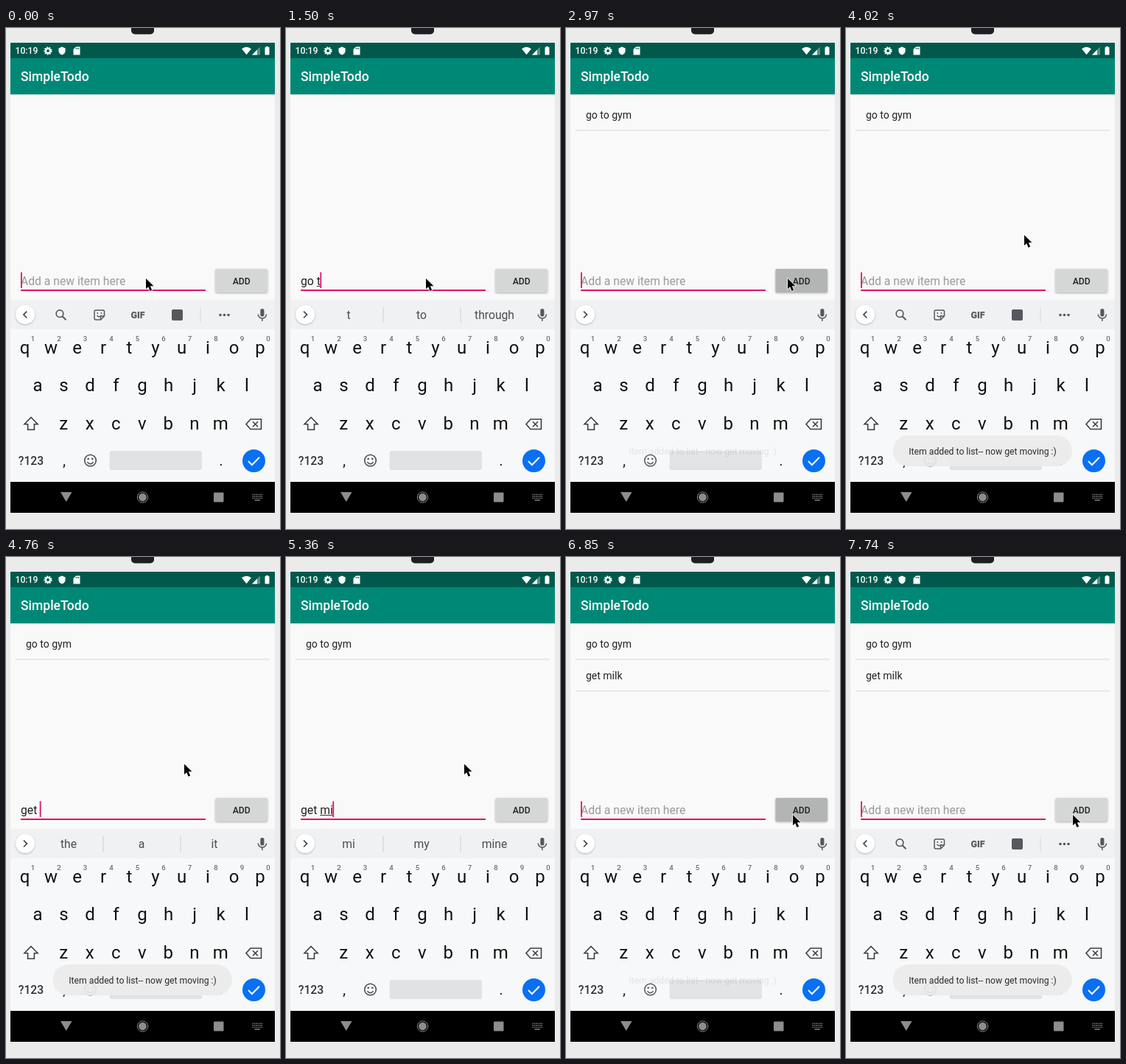
Recreate the animation shown at these times as an HTML page with a canvas. Size 372 px wide and 680 px high, loop 8 s.

```html
<!DOCTYPE html>
<html lang="en">
<head>
<meta charset="utf-8">
<title>Todo list</title>
<style>
html, body { margin: 0; width: 100%; height: 100%; overflow: hidden; background: #ebebec; }
canvas { display: block; width: 372px; height: 680px; }
</style>
</head>
<body>
<canvas id="stage"></canvas>
<script>
const W = 372, H = 680, LOOP = 8000;
const canvas = document.getElementById('stage');
const ratio = window.devicePixelRatio || 1;
canvas.width = W * ratio;
canvas.height = H * ratio;
const ctx = canvas.getContext('2d');

const ACCENT = '#e0106b', ICON = '#55595e';
const ADDED = { text: '', words: [], caret: true };

// Each step changes part of the state; words: null shows the tool icons.
const steps = [
  [0, { text: '', words: null, caret: true, mouse: [190, 340], items: [], button: '#d5d7d6', toast: 0 }],
  [300, { text: 'g', words: ['g', 'good', 'go'] }],
  [450, { text: 'go', words: ['go', 'going', 'good'] }],
  [1050, { caret: false }],
  [1200, { text: 'go ', words: ['to', 'back', 'ahead'], caret: true }],
  [1350, { text: 'go t' }],
  [1500, { words: ['t', 'to', 'through'] }],
  [1640, { text: 'go to', words: ['to', 'too', 'today'] }],
  [1790, { text: 'go to ', words: ['the', 'bed', 'sleep'] }],
  [1940, { text: 'go to gy', words: ['gy', 'gym', 'guy'] }],
  [2080, { text: 'go to gym', words: ['gym', 'gyms', 'gym and'] }],
  [2530, { caret: false, mouse: [218, 342] }],
  [2680, { mouse: [278, 341] }],
  [2830, { mouse: [301, 340], button: '#c3c5c4' }],
  [2970, { ...ADDED, items: ['go to gym'], button: '#b3b5b4', toast: 0.1 }],
  [3120, { words: null, toast: 0.85 }],
  [3270, { button: '#d5d7d6', toast: 1 }],
  [3420, { mouse: [296, 334] }],
  [3570, { mouse: [274, 309], caret: false }],
  [3720, { mouse: [259, 296] }],
  [3870, { mouse: [246, 285] }],
  [4020, { mouse: [242, 281], caret: true }],
  [4470, { text: 'g', words: ['g', 'go', 'good'] }],
  [4620, { text: 'get', words: ['get', 'gets', 'getting'] }],
  [4760, { text: 'get ', words: ['the', 'a', 'it'] }],
  [5060, { toast: 0.5 }],
  [5210, { text: 'get m', words: ['m', 'my', 'me'], toast: 0 }],
  [5360, { text: 'get mi', words: ['mi', 'my', 'mine'] }],
  [5510, { text: 'get mil', words: ['mil', 'milk', 'mild'] }],
  [5660, { text: 'get milk' }],
  [5810, { words: ['milk', 'cup', 'Jorv to'] }],
  [6250, { caret: false, mouse: [277, 306] }],
  [6400, { mouse: [298, 335] }],
  [6550, { mouse: [308, 350] }],
  [6700, { button: '#c3c5c4' }],
  [6850, { ...ADDED, items: ['go to gym', 'get milk'], button: '#b3b5b4', toast: 0.1 }],
  [7000, { words: null, button: '#c9cbca', toast: 0.85 }],
  [7150, { button: '#d5d7d6', toast: 0.97 }],
  [7300, { caret: false, toast: 1 }],
  [7740, { caret: true }]
];

function stateAt(time) {
  return Object.assign({}, ...steps.filter(s => s[0] <= time).map(s => s[1]));
}

function rect(x, y, w, h, color, radius = 0) {
  ctx.fillStyle = color;
  ctx.beginPath();
  ctx.roundRect(x, y, w, h, radius);
  ctx.fill();
}

function disc(x, y, r, color) {
  ctx.fillStyle = color;
  ctx.beginPath();
  ctx.arc(x, y, r, 0, 7);
  ctx.fill();
}

function ring(x, y, r, color, width) {
  ctx.strokeStyle = color;
  ctx.lineWidth = width;
  ctx.beginPath();
  ctx.arc(x, y, r, 0, 7);
  ctx.stroke();
}

function stroke(path, color, width = 1.6) {
  ctx.strokeStyle = color;
  ctx.lineWidth = width;
  ctx.stroke(new Path2D(path));
}

function fill(path, color) {
  ctx.fillStyle = color;
  ctx.fill(new Path2D(path));
}

function label(str, x, y, size, color, align = 'left', weight = 400) {
  ctx.font = `${weight} ${size}px Roboto, sans-serif`;
  ctx.textAlign = align;
  ctx.fillStyle = color;
  ctx.fillText(str, x, y);
}

function shadowed(blur, dy, alpha, draw) {
  ctx.save();
  ctx.shadowColor = `rgba(0,0,0,${alpha})`;
  ctx.shadowBlur = blur * ratio;
  ctx.shadowOffsetY = dy * ratio;
  draw();
  ctx.restore();
}

function drawStatusBar() {
  rect(6, 20, 359, 21, '#00594c');
  label('10:19', 12.5, 35, 12.2, '#fff', 'left', 500);
  ring(57, 31, 3.1, '#fff', 2.4);
  ctx.setLineDash([2, 1.35]);
  ring(57, 31, 4.8, '#fff', 1.6);
  ctx.setLineDash([]);
  fill('M76 25.5l4.6 2v3.2c0 2.8-2 5-4.6 5.8c-2.6-.8-4.6-3-4.6-5.8v-3.2z', '#fff');
  fill('M95 25.5h5.5v11h-9v-7.5z', '#fff');
  for (let i = 0; i < 3; i++) rect(94.6 + i * 1.8, 27, 0.9, 2, '#00594c');
  fill('M320 28.2q6.5-5 13 0l-6.5 8z', '#fff');
  fill('M345 25.5v11h-11z', 'rgba(255,255,255,.35)');
  fill('M341 29.5v7h-7z', '#fff');
  rect(351.5, 26, 6, 10.5, '#fff', 0.8);
  rect(353, 25, 3, 2, '#fff');
}

function drawApp(s) {
  rect(6, 90, 359, 279, '#f9f9f9');
  shadowed(2, 1, 0.15, () => rect(6, 41, 359, 49, '#008877'));
  drawStatusBar();
  label('SimpleTodo', 20, 72, 17.5, '#fff', 'left', 500);

  s.items.forEach((item, i) => {
    label(item, 27, 123 + i * 43, 14, '#222');
    rect(13, 138.3 + i * 43, 345, 1.2, '#dedede');
  });

  rect(20, 355, 251, 2, ACCENT);
  label(s.text || 'Add a new item here', 20, 348.5, 15.7, s.text ? '#212121' : '#9a9a9a');
  const start = s.text.lastIndexOf(' ') + 1;
  const end = 20 + ctx.measureText(s.text).width;
  const wordX = 20 + ctx.measureText(s.text.slice(0, start)).width;
  if (s.text) rect(wordX, 350, end - wordX, 1, '#333');
  if (s.caret) rect(s.text ? end - 0.4 : 20, 331.5, 1.8, 21.5, ACCENT);

  shadowed(3, 1, 0.3, () => rect(284.5, 327, 70.5, 32, s.button, 2));
  label('ADD', 319.7, 347.5, 12.2, '#222', 'center', 500);
}

function drawTools() {
  ring(73, 387.7, 4.8, ICON, 1.7);
  stroke('M76.5 391.3l5 5', ICON, 2);
  stroke('M122 383h9.5q2 0 2 2v6l-5 5h-6.5q-2 0-2-2v-9q0-2 2-2zM133.5 391h-3q-2 0-2 2v3', ICON, 1.5);
  stroke('M123.5 390q3 3.5 6 0', ICON, 1.4);
  disc(124.3, 387, 1, ICON);
  disc(129.5, 387, 1, ICON);
  label('GIF', 179, 393.5, 12.5, ICON, 'center', 900);
  rect(225, 382, 15, 15, ICON, 2);
  rect(263.5, 380, 1, 20, '#d8dadd');
  for (let i = -1; i < 2; i++) disc(296.5 + i * 5.5, 389.5, 1.8, ICON);
}

function drawWords(words) {
  words.forEach((word, i) => {
    const x = 85 + i * 99;
    if (word === 'cup') {
      fill(`M${x - 5} 382h10l-1 16h-8z`, '#e3e5e7');
      rect(x - 3.5, 387, 7, 9, '#fafafa');
    } else label(word, x, 395, 15.7, '#4a4e53', 'center');
  });
  if (words.length) [131.5, 236.5].forEach(x => rect(x, 379, 1.2, 21, '#d3d6d9'));
}

function drawStrip(words) {
  rect(6, 369, 359, 40, '#eff1f3');
  shadowed(2.5, 1, 0.25, () => disc(26, 389, 13, '#fff'));
  stroke(words ? 'M24 384.7l4.4 4.4l-4.4 4.4' : 'M28.3 384.7l-4.4 4.4l4.4 4.4', '#45494d', 1.7);
  if (words) drawWords(words);
  else drawTools();
  rect(345.3, 381, 5.2, 10.5, ICON, 2.6);
  stroke('M342.3 388.5a5.6 5.6 0 0 0 11.2 0M347.9 394v4', ICON, 1.5);
}

function drawKeys() {
  rect(6, 409, 359, 207, '#f7f8f9');
  const rows = [['qwertyuiop', 25.5, 442], ['asdfghjkl', 43, 493], ['zxcvbnm', 78.3, 544.5]];
  for (const [keys, x, y] of rows) {
    [...keys].forEach((key, i) => label(key, x + i * 35.5, y, 24, '#111', 'center'));
  }
  for (let i = 0; i < 10; i++) {
    label((i + 1) % 10, 36.5 + i * 35.5, 424.5, 9.6, '#6a6d70', 'center', 500);
  }
  stroke('M34 528.5l9 9.3h-4.6v7.5h-8.8v-7.5h-4.6z', '#3c4043', 1.6);
  stroke('M332 531h14.5v13.5h-14.5l-6-6.75zM335 534.2l7 7m0-7l-7 7', '#3c4043', 1.6);
  label('?123', 34, 592.5, 15.7, '#33373a', 'center', 500);
  label(',', 79, 594, 21, '#222', 'center');
  label('.', 292, 594, 21, '#222', 'center');
  ring(114.5, 587, 7.8, '#4b4f53', 1.6);
  disc(111.7, 584.8, 1.3, '#4b4f53');
  disc(117.3, 584.8, 1.3, '#4b4f53');
  stroke('M110.4 589.3q4.1 4.8 8.2 0', '#4b4f53', 1.5);
  rect(140.5, 574, 125.5, 26, '#e1e2e3', 3);
  disc(336.5, 587.5, 15.5, '#0870f3');
  stroke('M329 588l5 5l10-10.3', '#fff', 2);
}

function drawNav() {
  rect(6, 616, 359, 42, '#000');
  fill('M74 630h15.5l-7.75 13z', '#8d8d8d');
  ring(185.5, 637, 7.2, '#8d8d8d', 1);
  disc(185.5, 637, 5.4, '#8d8d8d');
  rect(282, 630.5, 13.5, 13, '#8d8d8d', 1);
  for (let row = 0; row < 3; row++) {
    for (let i = 0; i < 6; i++) rect(334.5 + i * 2.4, 632.5 + row * 2.6, 1.4, 1.4, '#858585');
  }
  rect(337.5, 640.3, 7.5, 1.4, '#858585');
}

function drawToast(alpha) {
  if (!alpha) return;
  ctx.save();
  ctx.globalAlpha = alpha * 0.92;
  rect(63.5, 553, 243.5, 42, '#ececec', 21);
  ctx.globalAlpha = alpha;
  label('Item added to list-- now get moving :)', 185.5, 578.5, 12.2, '#2b2b2b', 'center');
  ctx.restore();
}

function drawMouse([x, y]) {
  ctx.save();
  ctx.translate(x, y);
  const arrow = 'M0 0v14.3l3.2-3l2.4 5.6l2.6-1.1l-2.4-5.5h4.6z';
  ctx.lineJoin = 'round';
  stroke(arrow, '#fff', 1.6);
  fill(arrow, '#000');
  ctx.restore();
}

function draw(time) {
  const s = stateAt(time);
  ctx.setTransform(ratio, 0, 0, ratio, 0, 0);
  rect(0, 0, W, H, '#ebebec');
  rect(170, -8, 31, 16.5, '#1e1e20', 5);
  drawApp(s);
  drawStrip(s.words);
  drawKeys();
  drawNav();
  drawToast(s.toast);
  drawMouse(s.mouse);
}

const begin = performance.now();
function tick() {
  draw((performance.now() - begin) % LOOP);
  requestAnimationFrame(tick);
}
tick();
</script>
</body>
</html>
```
